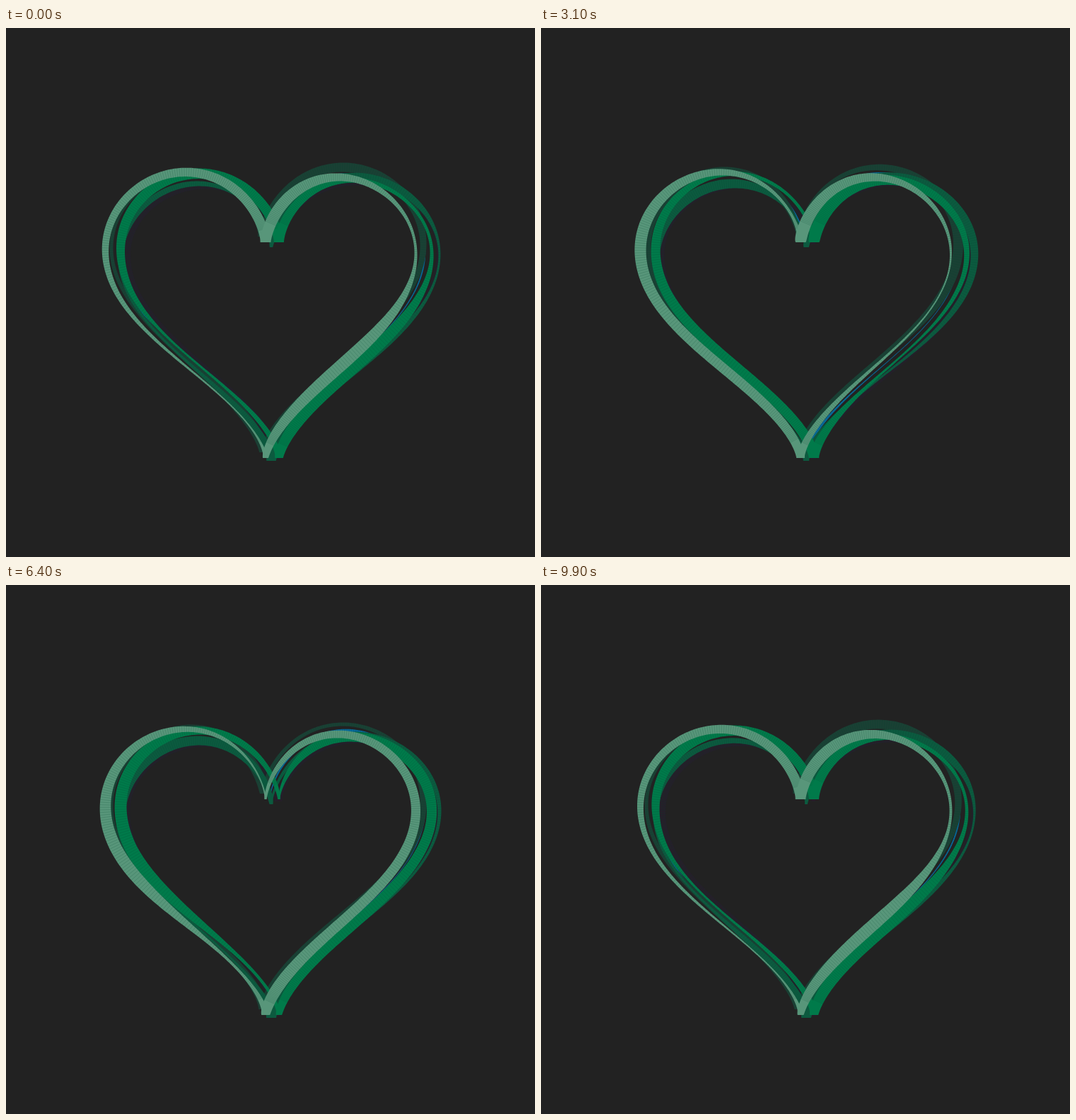
Animation of 748 by 748 pixels, one loop 10 s. Source, as an HTML page with a canvas:

```html
<!DOCTYPE html>
<html lang="en">
<head>
<meta charset="utf-8">
<title>Flowing heart</title>
<style>
  html, body { margin: 0; width: 100%; height: 100%; overflow: hidden; background: #222; }
  canvas { display: block; }
</style>
</head>
<body>
<canvas id="stage" width="748" height="748"></canvas>
<script>
const ctx = document.getElementById('stage').getContext('2d');
const LOOP = 10000, STEP = 100, SEGMENTS = 250, HORIZON = 374;

// Back to front. cusp and tip are heights, lean is the sideways perspective,
// rise the perspective of the upper half, lobe the height of the arches.
// widths are evenly spaced ribbon widths around the loop.
const ribbons = [
  { color: '#251f29', x: 385, cusp: 306, tip: 610, half: 220, lean: -.03, rise: -.03, lobe: .88,
    widths: [5, 6, 8, 9, 10, 12, 10, 8, 7, 6, 6, 6] },
  { color: '#07699a', x: 373, cusp: 303, tip: 609, half: 216, lean: -.015, rise: -.01, lobe: 1,
    widths: [1, 1, 4, 4, 1, 1, 3, 4, 1, 2, 1, 1] },
  { color: '#1a4034', x: 364, cusp: 295, tip: 600, half: 220.5, lean: -.025, rise: -.035, lobe: .99,
    widths: [15, 11, 6, 5, 7, 14, 11, 6, 4, 9, 13, 12] },
  { color: '#0c5a3f', x: 375, cusp: 310, tip: 612, half: 225.5, lean: -.055, rise: -.055, lobe: .99,
    widths: [4, 4, 8, 7, 3, 9.5, 13, 15, 9, 3, 13, 13] },
  { color: '#007a4a', x: 386, cusp: 303, tip: 608, half: 220, lean: .018, rise: .056, lobe: .965,
    widths: [14, 14, 14.5, 12, 3, 6.5, 11, 16, 16.5, 5, 6, 12] },
  { color: '#58967a', x: 367, cusp: 303, tip: 608, half: 219.5, lean: .032, rise: .044, lobe: .995,
    widths: [14.5, 13.5, 12, 9.5, 4, 2, 7.5, 14, 16.5, 4, 9, 16] }
];

// Periodic Catmull-Rom interpolation.
function widthAt(values, phase) {
  const n = values.length;
  const p = (phase - Math.floor(phase)) * n;
  const i = Math.floor(p), f = p - i;
  const [a, b, c, d] = [-1, 0, 1, 2].map(k => values[(i + k + n) % n]);
  const w = b + f / 2 * (c - a + f * (2 * a - 5 * b + 4 * c - d + f * (3 * (b - c) + d - a)));
  return Math.max(w, .8);
}

function heartPoint(r, a, side) {
  const nx = side * Math.sin(a) ** 3;
  const up = 13 * Math.cos(a) - 5 * Math.cos(2 * a) - 2 * Math.cos(3 * a) - Math.cos(4 * a) - 5;
  const y = r.cusp - up * (r.tip - r.cusp) / 22 * (up > 0 ? r.lobe : 1);
  const depth = y < HORIZON ? r.rise : r.lean;
  return [r.x + r.half * nx * (1 - r.lean * nx), HORIZON + (y - HORIZON) * (1 - depth * nx)];
}

function drawHalf(r, side, time) {
  const outer = [], inner = [];
  for (let i = 0; i <= SEGMENTS; i++) {
    const a = Math.PI * i / SEGMENTS;
    const [x, y] = heartPoint(r, a, side);
    const [x0, y0] = heartPoint(r, Math.max(a - .004, 0), side);
    const [x1, y1] = heartPoint(r, Math.min(a + .004, Math.PI), side);
    const turn = a / (2 * Math.PI);
    const w = widthAt(r.widths, (side < 0 ? turn : 1 - turn) - time) / 2;
    const len = Math.hypot(x1 - x0, y1 - y0) || 1;
    const dx = -(y1 - y0) / len * w, dy = (x1 - x0) / len * w;
    outer.push([x + dx, y + dy]);
    inner.push([x - dx, y - dy]);
  }

  ctx.beginPath();
  for (const p of outer) ctx.lineTo(...p);
  for (const p of inner.slice().reverse()) ctx.lineTo(...p);
  ctx.closePath();
  ctx.fillStyle = r.color;
  ctx.fill();

  // Fine seams between the ribbon's facets.
  ctx.beginPath();
  for (let i = 1; i < SEGMENTS; i++) {
    const gap = Math.hypot(outer[i][0] - outer[i - 1][0], outer[i][1] - outer[i - 1][1]);
    if (gap < 1.8) continue;
    ctx.moveTo(...outer[i]);
    ctx.lineTo(...inner[i]);
  }
  ctx.strokeStyle = 'rgba(0, 70, 45, .3)';
  ctx.lineWidth = .6;
  ctx.stroke();
}

function draw(now) {
  const time = Math.floor(now % LOOP / STEP) * STEP / LOOP;
  ctx.fillStyle = '#222';
  ctx.fillRect(0, 0, 748, 748);
  for (const r of ribbons) {
    drawHalf(r, -1, time);
    drawHalf(r, 1, time);
  }
}

const start = performance.now();
function tick() {
  draw(performance.now() - start);
  requestAnimationFrame(tick);
}
tick();
</script>
</body>
</html>
```
